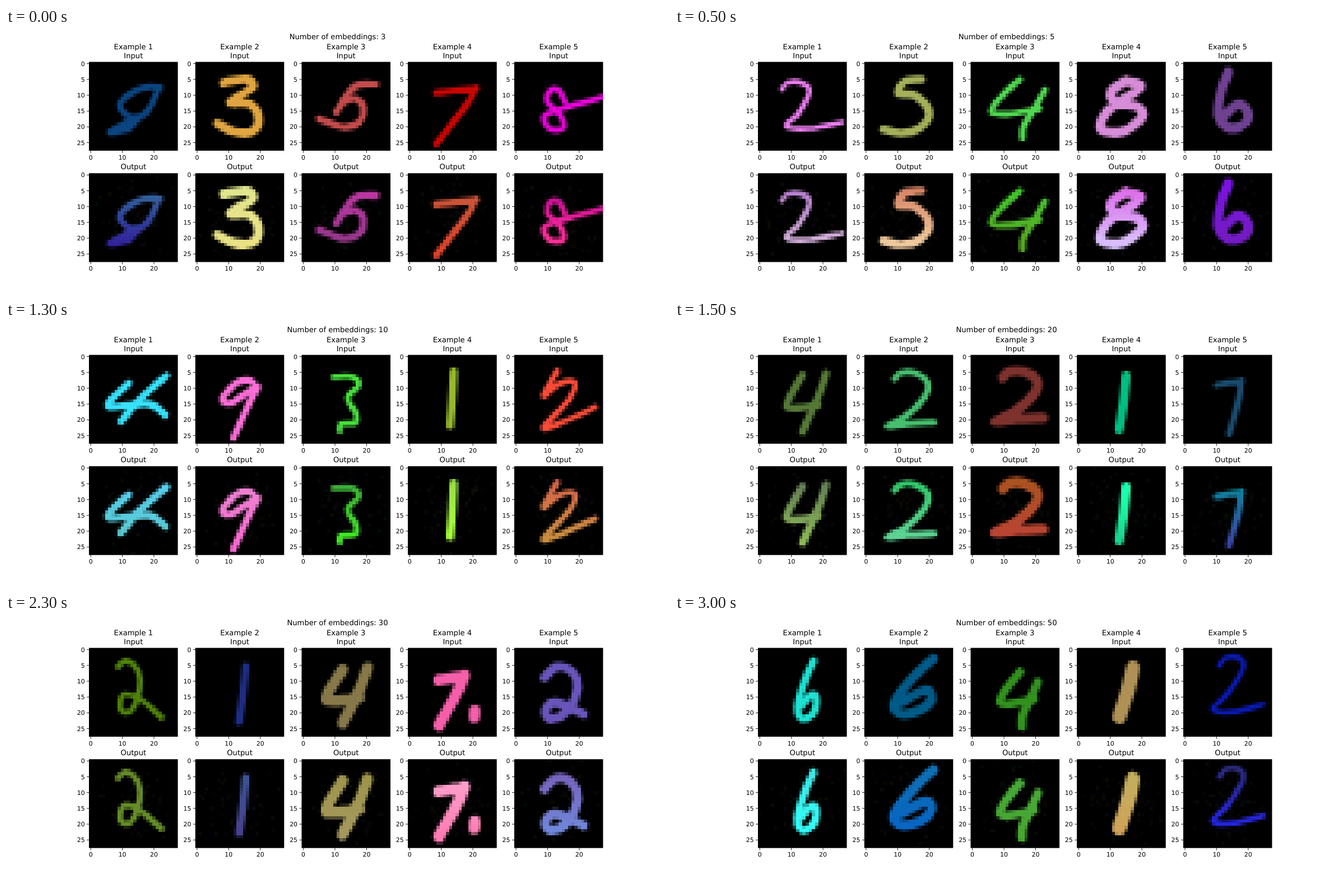
An HTML page with a canvas for the animation above (3.5 s loop, 1183 by 473 pixels).

```html
<!DOCTYPE html>
<html lang="en">
<head>
<meta charset="utf-8">
<title>Embeddings</title>
<style>
html, body { margin: 0; width: 100%; height: 100%; overflow: hidden; background: #fff; }
canvas, svg { position: absolute; left: 0; top: 0; }
text { font-family: "DejaVu Sans", sans-serif; text-rendering: geometricPrecision; }
</style>
</head>
<body>
<canvas id="stage" width="1183" height="473"></canvas>
<svg id="labels" width="1183" height="473"></svg>
<script>
const GRID = 28, SIZE = 157.9, CELL = SIZE / GRID, HOLD = 500;
const LEFT = 148.4, STEP = 189.69, TOPS = [60.8, 259.5];
const TITLE = 13.14, TICK = 10.95;

// Handwriting styles: key points of smooth strokes in a box of 10 by 10; a doubled point makes a corner.
const glyphs = {
  zero: "5,0 1,3 0,7 3,10 8,9 10,5 9,1 5,0/0,7.5 3,6.8 6,7.7",
  one: "10,0 6,5 0,10",
  two: "1.7,1.3 3,.2 6,.2 8.7,2 8,4.7 4,8.2 0,10 4.5,9.5 10,9.3",
  longTwo: "0,1.4 1,0 3.5,.1 4.6,2 2.7,6.9 .7,9.5 4.6,10 10,8.6",
  hookedTwo: "2.7,0 0,4.4 3,2.3 6,2 5,5 0,10 4,8.9 10,6.4",
  loopedTwo: "0,1.1 2,0 4.6,1.7 5,5 3,8.8 .7,8.5 1.3,6 5,6.7 10,10",
  curledTwo: "0,2 3,0 7,.8 8.5,4 6,8.3 1.6,10 .3,8.3 3,6.8 10,9",
  three: "1.5,.6 7,0 8.5,1.5 3.1,4.2 8,4.6 10,7.6 8,9.8 4,9.7 0,8.2",
  hookedThree: "0,.5 7.5,.5 10,2 5.6,4.2 9,7 8.5,8.6 3,8.8 2.5,10",
  four: "4,.3 1.6,3.1 0,5.8 4,5.9 8,5.4/10,0 8,4 4,10",
  openFour: "5.3,0 1.8,3 0,5.5 3,5.9 9,5/10,1.8 8,5 6,8 5.8,10",
  wideFour: "10,0 5.7,4.8 2.2,10/3.5,1.7 0,6.6 7,6.2 9.8,8.6",
  five: "10,0 7,.1 5.5,1.5 3,6.6/4.4,4 6.4,3.4 7.8,5.5 7,9 4,10 0,8.1",
  roundFive: "8.3,0 4.8,.3 3.3,2.6 7,3 10,6.2 8,9 4,10 0,9.3",
  six: "3.4,0 1,3.5 0,8 3,10 7,10 10,8.5 9,6.5 6,6 2,8",
  seven: "0,1 5,.6 10,.3 10,.3 8,3 0,10",
  eight: "4,0 1,2 2.8,4.3 8,5 10,7 6,10 .5,9.5 1,6 4,4 8,1 4,0",
  tailedEight: "10,1.7 3,4.8 0,6.7 .8,10 3.2,10 2.7,6.5 .5,3 1,0 2.5,0 3.5,3",
  nine: "9.5,1.4 8,0 4,.5 0,3.3 3,3.8 10,1 7.7,4 3.2,10",
  loopedNine: "10,.3 6,.6 2,4 4.5,6.7 7.5,5.3 9.5,1/5,6.7 0,9.7 3.8,9 5.6,6.7",
};
glyphs.dottedSeven = glyphs.seven + "/14.6,7 14.4,8.4";

// Digit: style, box (left, top, right, bottom) in cells, pen width, input colour,
// output colours at top and bottom, and how far the top leans right.
const scenes = [
  { count: 3, digits: [
    ["loopedNine", [6, 7, 22, 22], 2, "#0b4480", "#2c5488", "#2b2088"],
    ["three", [6.5, 5, 19.5, 22], 2.8, "#e0a540", "#c4c87c", "#ccc474"],
    ["five", [5, 6.5, 23, 20], 2.2, "#c34b4b", "#a22f8c", "#84307a"],
    ["seven", [8.3, 7.5, 20.5, 25.5], 2.1, "#c80500", "#b04a32", "#c03a24"],
    ["tailedEight", [9, 8.5, 27.5, 20.5], 1.8, "#eb00dc", "#b40f84", "#e02886"],
  ] },
  { count: 5, digits: [
    ["longTwo", [7, 6, 26, 20.5], 1.6, "#eb7df0", "#a06fb5", "#b698bc"],
    ["roundFive", [5.5, 5, 20, 22], 2.6, "#a5af5a", "#bb7358", "#d0b08a"],
    ["openFour", [6, 5, 23, 23.5], 2, "#50d750", "#38ae28", "#4c8f1e"],
    ["eight", [6.3, 5.5, 19, 21.5], 3.1, "#d78cd7", "#c060cc", "#bca5dc", 3.5],
    ["six", [10.5, 2.7, 20, 20], 3.1, "#6e4191", "#6a10c4", "#6418aa"],
  ] },
  { count: 10, digits: [
    ["wideFour", [5.5, 6, 24, 20.5], 2.3, "#37e1fa", "#4ab4d0", "#4fb0b8"],
    ["nine", [8, 7.5, 19, 25.7], 2.1, "#fa6ed7", "#d070b6", "#d85cb6"],
    ["hookedThree", [9.5, 5.5, 17.5, 23.5], 1.8, "#46e13c", "#359434", "#37d01c"],
    ["one", [12.8, 4.8, 13.9, 21.8], 2.5, "#96b92d", "#84c03c", "#91e032"],
    ["hookedTwo", [8.7, 4.5, 25, 22.5], 1.8, "#fa4b37", "#bc5540", "#b07c38"],
  ] },
  { count: 20, digits: [
    ["four", [8.5, 5.3, 21, 23.7], 2.4, "#557837", "#566e4a", "#7aa04c"],
    ["two", [6.5, 4.8, 21.5, 22], 2, "#46be6e", "#2aae5c", "#52b880"],
    ["two", [7, 4.5, 22.5, 20.5], 3.2, "#7d322d", "#94481c", "#a03c2c"],
    ["one", [12.8, 6, 15.1, 23], 2.9, "#00be82", "#18e99a", "#18b87c"],
    ["seven", [14, 7.3, 22, 24.5], 2, "#194b6e", "#0c7189", "#343b8d", -4.5],
  ] },
  { count: 30, digits: [
    ["loopedTwo", [8.5, 3.5, 22.5, 21.5], 1.8, "#50820a", "#587823", "#587c22"],
    ["one", [13.3, 5.3, 15.4, 22.8], 2.4, "#1e2d82", "#344980", "#3d3a7c"],
    ["four", [7.2, 5.7, 20.3, 23.3], 3.5, "#877849", "#8a8242", "#8f8552"],
    ["dottedSeven", [9.2, 8, 17, 24], 3.6, "#f55faa", "#f08ab0", "#e86c9b"],
    ["curledTwo", [9, 5.5, 21.3, 22], 2.9, "#6955b9", "#6856a4", "#6275bd"],
  ] },
  { count: 40, digits: [
    ["three", [2, 4.8, 16, 22], 2, "#5fcdd2", "#52c0c0", "#5cb8d6", 7],
    ["zero", [7, 4.7, 22, 22], 2, "#73c3af", "#72b398", "#60b8a0"],
    ["eight", [12, 5.5, 16.8, 21], 4.2, "#5f2d32", "#6c4046", "#633644"],
    ["one", [9.3, 5, 19.8, 21.8], 2.5, "#8c2d9b", "#9136a1", "#9724b3"],
    ["eight", [8.5, 5, 21, 22], 1.7, "#d2a04b", "#b87a45", "#ae9448"],
  ] },
  { count: 50, digits: [
    ["six", [11.2, 3.5, 17, 21.5], 2.3, "#1ee1d2", "#36c8c6", "#2cdcd8", 3.8],
    ["six", [7, 2.8, 18, 20], 3.1, "#005a87", "#0e629c", "#0758a8", 10.5],
    ["openFour", [8.7, 7, 20.7, 24.3], 2.7, "#32911e", "#3d9430", "#40902c"],
    ["one", [12.8, 5.7, 17.2, 21.2], 4.5, "#af9155", "#aa9852", "#b48e4e"],
    ["longTwo", [7.5, 2.5, 24, 19.7], 1.7, "#0a19af", "#252568", "#2020c0", 4],
  ] },
];

// Catmull-Rom curve through the points.
function smoothPath(points) {
  const path = new Path2D();
  const at = i => points[Math.max(0, Math.min(points.length - 1, i))];
  path.moveTo(...points[0]);
  for (let i = 0; i < points.length - 1; i++) {
    const [a, b, c, d] = [at(i - 1), at(i), at(i + 1), at(i + 2)];
    path.bezierCurveTo(b[0] + (c[0] - a[0]) / 6, b[1] + (c[1] - a[1]) / 6,
      c[0] - (d[0] - b[0]) / 6, c[1] - (d[1] - b[1]) / 6, ...c);
  }
  return path;
}

function drawGlyph(g, name, [left, top, right, bottom], lean) {
  const place = point => {
    const [u, v] = point.split(",").map(n => n / 10);
    return [left + u * (right - left) + lean * (1 - v) + 0.5, top + v * (bottom - top) + 0.5];
  };
  for (const stroke of glyphs[name].split("/")) g.stroke(smoothPath(stroke.split(" ").map(place)));
}

function seededRandom(seed) {
  return () => (seed = (seed * 16807) % 2147483647) / 2147483647;
}

function blankGrid() {
  const canvas = document.createElement("canvas");
  canvas.width = canvas.height = GRID;
  const g = canvas.getContext("2d");
  g.fillRect(0, 0, GRID, GRID);
  g.lineCap = g.lineJoin = "round";
  return g;
}

function inputImage([name, box, width, ink, , , lean = 0]) {
  const g = blankGrid();
  g.strokeStyle = ink;
  g.lineWidth = width;
  drawGlyph(g, name, box, lean);
  return g.canvas;
}

// A softer copy of the input with shifted colours and faint specks around it.
function outputImage([name, box, width, , topColour, bottomColour, lean = 0], seed) {
  const g = blankGrid(), random = seededRandom(seed);
  const level = () => Math.floor(random() * 12);
  const spread = () => Math.floor((random() + random()) * GRID / 2);
  for (let i = 0; i < 70; i++) {
    g.fillStyle = `rgb(${level()},${level()},${level()})`;
    g.fillRect(spread(), spread(), 1, 1);
  }
  const gradient = g.createLinearGradient(0, box[1], 0, box[3]);
  gradient.addColorStop(0, topColour);
  gradient.addColorStop(1, bottomColour);
  g.strokeStyle = gradient;
  g.lineWidth = width + 0.1;
  g.filter = "blur(0.6px) brightness(1.15)";
  drawGlyph(g, name, box, lean);
  return g.canvas;
}

const images = scenes.map((scene, s) => scene.digits.map((digit, d) =>
  [inputImage(digit), outputImage(digit, 101 + s * 977 + d * 131)]));

const label = (x, y, size, text, anchor = "middle") =>
  `<text x="${x}" y="${y}" font-size="${size}" text-anchor="${anchor}">${text}</text>`;
const bar = (x, y, w, h) => `<rect x="${x}" y="${y}" width="${w}" height="${h}"/>`;

function axes(column, row) {
  const left = LEFT + column * STEP, top = TOPS[row], bottom = top + SIZE, middle = left + SIZE / 2;
  let out = label(middle, top - 7.1, TITLE, row ? "Output" : "Input");
  if (!row) out += label(middle, top - 22.8, TITLE, `Example ${column + 1}`);
  for (let v = 0; v <= 25; v += 5) {
    const offset = (v + 0.5) * CELL, x = left + offset, y = top + offset;
    out += bar(left - 4.2, y - 0.45, 4.2, 0.9) + label(left - 7.7, y + 4, TICK, v, "end");
    if (v % 10 === 0) out += bar(x - 0.45, bottom, 0.9, 4.2) + label(x, bottom + 16, TICK, v);
  }
  return out;
}

const labels = document.getElementById("labels");
let markup = `<text id="heading" x="591.5" y="20" font-size="${TITLE}" text-anchor="middle"></text>`;
for (let column = 0; column < 5; column++) markup += axes(column, 0) + axes(column, 1);
labels.innerHTML = markup;

const heading = document.getElementById("heading");
const stage = document.getElementById("stage").getContext("2d");
stage.imageSmoothingEnabled = false;
let shown = -1;

function show(index) {
  heading.textContent = `Number of embeddings: ${scenes[index].count}`;
  stage.clearRect(0, 0, 1183, 473);
  images[index].forEach((pair, column) => pair.forEach((image, row) => {
    const x = LEFT + column * STEP, y = TOPS[row];
    stage.fillRect(x - 0.3, y - 0.3, SIZE + 0.6, SIZE + 0.6);
    stage.drawImage(image, x, y, SIZE, SIZE);
  }));
}

function tick() {
  const index = Math.floor(performance.now() / HOLD) % scenes.length;
  if (index !== shown) show(shown = index);
  requestAnimationFrame(tick);
}
tick();
</script>
</body>
</html>
```
